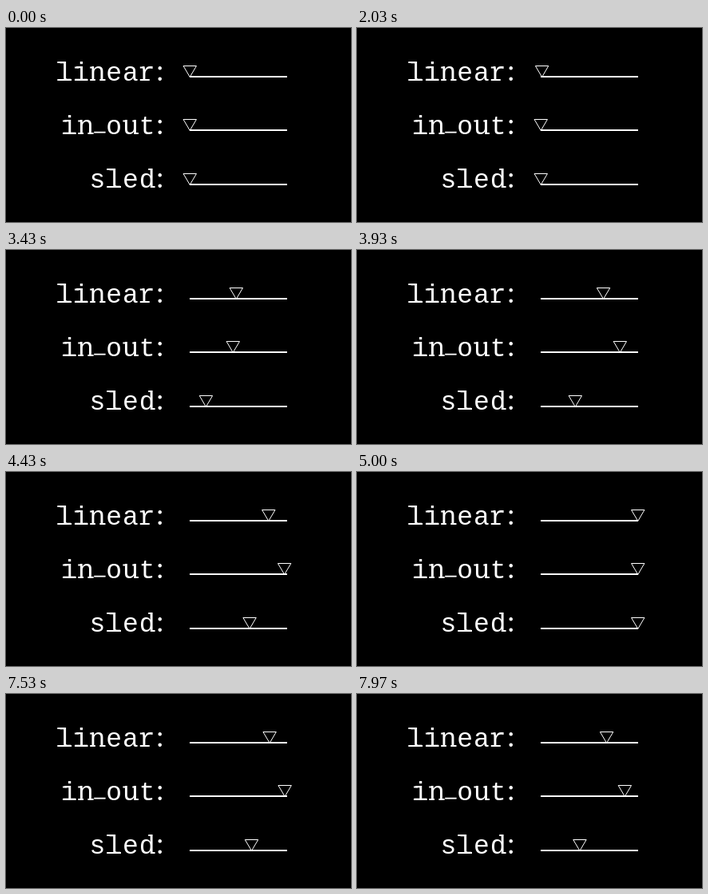
An HTML page for the animation above (8000 ms loop, 432 by 243 pixels).

```html
<!DOCTYPE html>
<html lang="en">
<head>
<meta charset="utf-8">
<title>Easing curves</title>
<style>
html, body { margin: 0; height: 100%; background: #000; overflow: hidden; }
svg { display: block; width: 100vw; height: 100vh; }
text { font: 33px "Liberation Mono", monospace; letter-spacing: .9px; fill: #fff; text-anchor: end; }
.colon { font: 38px "Liberation Serif", serif; letter-spacing: 0; }
.low { font-size: 23px; stroke: #fff; stroke-width: .5; }
path { fill: none; stroke: #fff; stroke-width: 2; }
.marker { stroke-width: 1; }
</style>
</head>
<body>
<svg viewBox="0 0 432 243">
  <defs>
    <path id="l" d="M1-1H18.8M1-23H7"/>
    <path id="i" d="M2-1H18.5M2-16.4H7"/>
    <path id="n" d="M.5-1H7.2M12.6-1H19.8M.5-16.4H4"/>
    <path id="r" d="M1-1H13M1-16.4H6"/>
    <path id="u" d="M.5-16.4H4M12.4-16.4H16M16-1H20"/>
    <path id="d" d="M11.6-23H16M16-1H20"/>
  </defs>
  <text x="198" y="66">linear<tspan class="colon">:</tspan></text>
  <text x="198" y="133">in<tspan class="low" dy="-4.3">_</tspan><tspan dy="4.3">out</tspan><tspan class="colon">:</tspan></text>
  <text x="198" y="200">sled<tspan class="colon">:</tspan></text>
  <!-- slab serifs -->
  <use href="#l" x="63.3" y="66"/>
  <use href="#i" x="84" y="66"/>
  <use href="#n" x="104.7" y="66"/>
  <use href="#r" x="166.8" y="66"/>
  <use href="#i" x="69.1" y="133"/>
  <use href="#n" x="89.8" y="133"/>
  <use href="#u" x="145.9" y="133"/>
  <use href="#l" x="125.2" y="200"/>
  <use href="#d" x="166.6" y="200"/>
  <path d="M230 61h122M230 128h122M230 196h122"/>
  <path class="marker" d="M-8.2-13.5H8.2L0 .4Z"/>
  <path class="marker" d="M-8.2-13.5H8.2L0 .4Z"/>
  <path class="marker" d="M-8.2-13.5H8.2L0 .4Z"/>
</svg>
<script>
const LOOP = 8000, LEFT = 230.25, LENGTH = 121.5;
const rows = [61, 128, 196];
const markers = document.querySelectorAll('.marker');

const linear = t => t;

function inOut(t) {
  const a = t ** 2.5, b = (1 - t) ** 2.5;
  return a / (a + b);
}

// Acceleration ramps up until RAMP, then stays constant.
const RAMP = .26, ACCEL = 2.623;
function sled(t) {
  return t < RAMP
    ? ACCEL * t ** 3 / (6 * RAMP)
    : ACCEL * ((t - RAMP / 2) ** 2 / 2 + RAMP ** 2 / 24);
}

const eases = [linear, inOut, sled];

function draw(now) {
  const step = Math.floor(now % LOOP * .03 + .15); // 30 steps per second
  const t = step > 210
    ? 1 - (step - 210) / 90
    : Math.min(1, Math.max(0, (step - 60) / 90));
  eases.forEach((ease, i) => {
    const x = LEFT + LENGTH * ease(t);
    markers[i].setAttribute('transform', `translate(${x} ${rows[i]})`);
  });
}

const start = performance.now();
function tick() {
  draw(performance.now() - start);
  requestAnimationFrame(tick);
}
tick();
</script>
</body>
</html>
```
